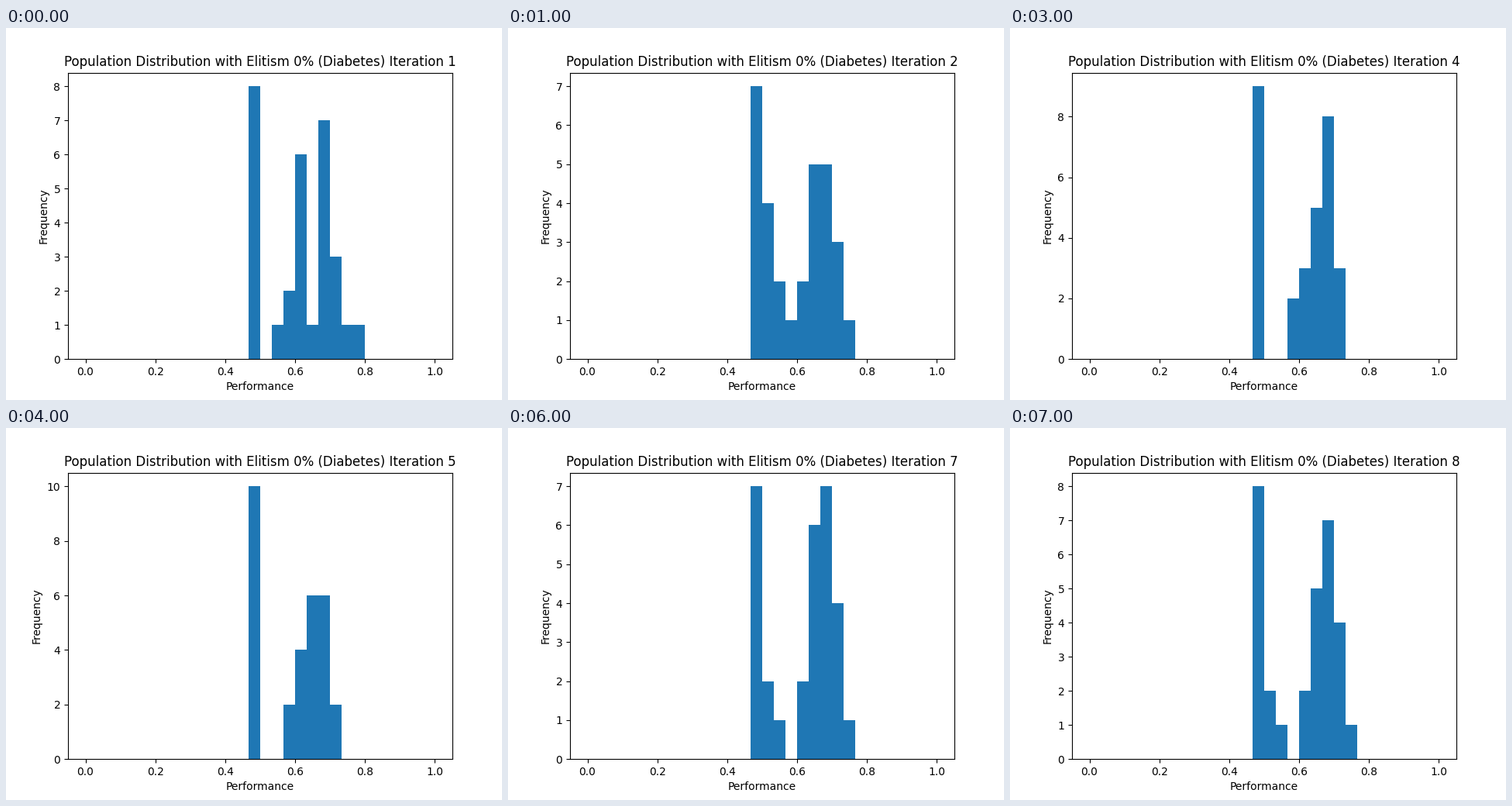
Animation of 640 by 480 pixels, one loop 8 s. Source, as a matplotlib script:

```python
import matplotlib.pyplot as plt
import numpy as np
from matplotlib.animation import FuncAnimation

BINS = 30
FIRST_BIN = 14  # all bars lie in the bins from here on

# Bar heights per iteration; each population has 30 members.
COUNTS = [
    [8, 0, 1, 2, 6, 1, 7, 3, 1, 1],
    [7, 4, 2, 1, 2, 5, 5, 3, 1],
    [15, 0, 0, 2, 1, 2, 9, 1],
    [9, 0, 0, 2, 3, 5, 8, 3],
    [10, 0, 0, 2, 4, 6, 6, 2],
    [6, 1, 1, 0, 2, 7, 7, 5, 1],
    [7, 2, 1, 0, 2, 6, 7, 4, 1],
    [8, 2, 1, 0, 2, 5, 7, 4, 1],
]

fig, ax = plt.subplots(figsize=(6.4, 4.8), dpi=100)


def draw(i):
    heights = COUNTS[i]
    centres = (FIRST_BIN + np.arange(len(heights)) + 0.5) / BINS
    ax.clear()
    ax.hist(np.repeat(centres, heights), bins=BINS, range=(0, 1), color="#1f77b4")
    ax.set_title(f"Population Distribution with Elitism 0% (Diabetes) Iteration {i + 1}")
    ax.set_xlabel("Performance")
    ax.set_ylabel("Frequency")
    return []


anim = FuncAnimation(fig, draw, frames=len(COUNTS), interval=1000,
                     repeat=True, repeat_delay=0)
plt.show()
```
